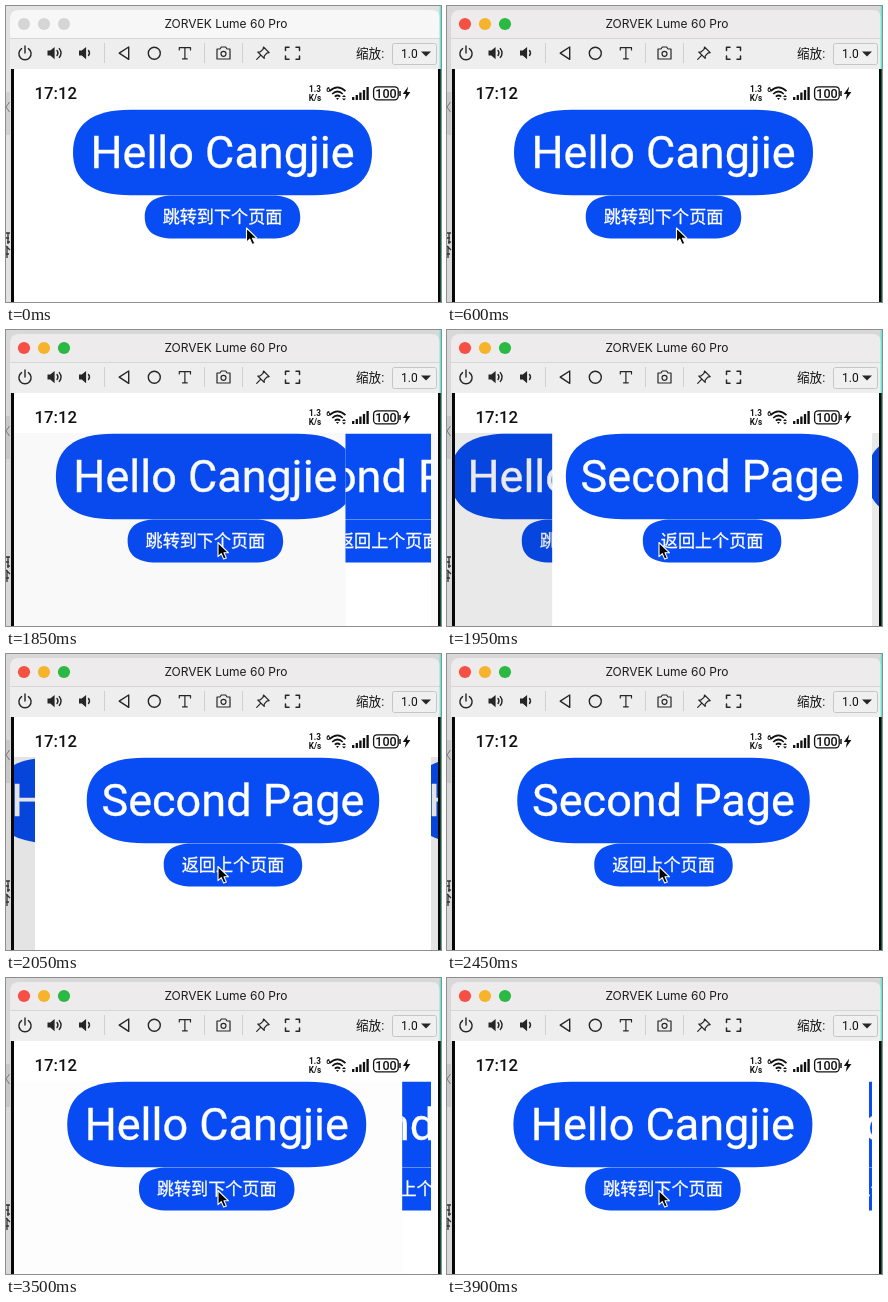
An HTML page for the animation above (4250 ms loop, 435 px wide and 296 px high).

```html
<!DOCTYPE html>
<html lang="zh">
<head>
<meta charset="utf-8">
<title>Page navigation</title>
<style>
  html, body { margin: 0; width: 100%; height: 100%; overflow: hidden; background: #ddd; }
  svg { display: block; width: 435px; height: 296px; }
  text { font-family: Roboto, "Noto Sans CJK SC", "Noto Sans CJK", sans-serif; }
  .heading { font-size: 45px; stroke-width: .35; }
  .label { font: 500 17.1px "Noto Sans CJK SC", "Noto Sans CJK", sans-serif; stroke-width: .3; }
  .page text { fill: #fff; stroke: #fff; text-anchor: middle; }
  .page path { fill: #084cf4; }
  .icon { fill: none; stroke: #262626; stroke-width: 1.4; stroke-linejoin: round; stroke-linecap: round; }
  .solid { fill: #262626; }
</style>
</head>
<body>
<svg viewBox="0 0 435 296" xmlns="http://www.w3.org/2000/svg">
  <defs>
    <clipPath id="viewClip"><rect x="8" y="103" width="417" height="193"/></clipPath>
    <clipPath id="wrapClip"><rect x="425" y="103" width="7" height="193"/></clipPath>
    <clipPath id="reveal"><rect id="revealBox" x="425" y="103" width="417" height="193"/></clipPath>
  </defs>

  <!-- desktop behind the window -->
  <rect id="desktop" width="435" height="296"/>
  <path d="M0 86H4V129H0Z" fill="#000" opacity=".08"/>
  <path d="M3.5 96L0 101L3.5 106" fill="none" stroke="#777"/>
  <path d="M0 227H4M0 232H3M1 236H4M0 240L4 244M0 248H3M2 227V238M1 240V252" stroke="#333" stroke-width="1.3"/>

  <!-- window -->
  <path id="titleBar" d="M4 32V13Q4 4 13 4H425Q434 4 434 13V32Z"/>
  <g id="lights"><circle cx="18" cy="18" r="6.1"/><circle cx="38" cy="18" r="6.1"/><circle cx="58" cy="18" r="6.1"/></g>
  <text x="220" y="22.2" text-anchor="middle" fill="#1c1c1c" style="font:400 12px Inter,sans-serif">ZORVEK Lume 60 Pro</text>
  <rect x="4" y="32" width="430" height="31" fill="#eeeeee"/>
  <path d="M4 32.5H434" stroke="#d6d6d6"/>
  <path d="M98.5 37V57M198.5 37V57M236.5 37V57" stroke="#cfcfcf"/>

  <!-- toolbar -->
  <g class="icon">
    <path d="M15.6 42.6A6.1 6.1 0 1 0 22.4 42.6M19 40V47"/>
    <path d="M51 44.5Q53 47 51 49.5M53.3 42.6Q56.8 47 53.3 51.4"/>
    <path d="M82.5 44.5Q84.5 47 82.5 49.5"/>
    <path d="M122.7 41V53.4L113.2 47.2Z"/>
    <circle cx="148.3" cy="47.2" r="6"/>
    <path d="M173.3 44V41.6H184.5V44M178.9 41.6V52.8M176.5 52.8H181.3" stroke-width="1.2"/>
    <path d="M211 43H214L215.3 41H219.7L221 43H224V53H211Z" stroke-width="1.2"/>
    <circle cx="217.5" cy="47.8" r="2.5" stroke-width="1.2"/>
    <path d="M257.5 41L263.2 46.7L260.8 47.2L258.2 50.2V52.4L251.8 46H254L257 43.4ZM254.8 49.2L250.7 53.3" stroke-width="1.2"/>
    <path d="M279.5 44.5V41.3H283M290 41.3H293.5V44.5M293.5 50V53.2H290M283 53.2H279.5V50" stroke-width="1.5"/>
  </g>
  <path class="solid" d="M41.5 44.6H44.3L48.6 41V53.2L44.3 49.6H41.5ZM73 44.6H75.8L80.1 41V53.2L75.8 49.6H73Z"/>
  <text x="350" y="52" font-size="12.6" fill="#111">缩放:</text>
  <rect x="386.5" y="37.5" width="44" height="21" rx="2" fill="#f0f0f0" stroke="#c6c6c6"/>
  <text x="395" y="52" font-size="12" fill="#111">1.0</text>
  <path class="solid" d="M415 45.5H425L420 50.5Z"/>

  <!-- device screen -->
  <rect x="5" y="63" width="429" height="233" fill="#080808"/>
  <rect x="8" y="63" width="424" height="233" fill="#fff"/>
  <text x="28.5" y="92.7" font-size="16.7" font-weight="500" fill="#111">17:12</text>
  <g fill="#111" font-size="8.2" font-weight="700" text-anchor="middle">
    <text x="309" y="86.3">1.3</text><text x="309" y="94.5">K/s</text>
    <text x="322.3" y="86" font-size="7">6</text>
    <text x="380" y="91.7" font-size="12.5" font-weight="500">100</text>
  </g>
  <g fill="none" stroke="#111" stroke-width="1.7">
    <path d="M323.5 85.2Q331.5 77.5 339.5 85.2M326.2 88Q331.5 83 336.8 88M328.8 90.7Q331.5 88.3 334.2 90.7"/>
    <rect x="367.6" y="80.8" width="24.6" height="13" rx="3.5" stroke-width="1.3"/>
    <path d="M394 85V90" stroke-width="1.5"/>
    <path d="M347.2 94V91M350.8 94V89M354.4 94V86.6M358 94V84M361.6 94V81" stroke-width="2.3"/>
  </g>
  <path d="M330 92L331.5 94L333 92ZM336 91L338 89L340 91ZM336 92.5H340L338 94.5ZM402.2 80.5L396.8 88H400L398.7 94L404.4 86H401Z" fill="#111"/>

  <g id="view" clip-path="url(#viewClip)">
    <rect x="8" y="103" width="417" height="193" fill="#fff"/>
    <g id="first" class="page"></g>
    <rect id="dim" x="8" y="103" width="417" height="193" opacity="0"/>
    <g clip-path="url(#reveal)">
      <rect x="8" y="103" width="900" height="193" fill="#fff"/>
      <g id="second" class="page"></g>
    </g>
  </g>
  <!-- the display is slightly wider than a page and repeats its left edge -->
  <g clip-path="url(#wrapClip)"><use href="#view" x="417"/></g>

  <path d="M434.3 0V63" stroke="#5fe8d8" stroke-width="1.4"/>
  <path d="M434.5 63V296" stroke="#0b5a38"/>
  <path id="cursor" d="M0 0V14.2L3.3 11.2L5.7 16.6L8.3 15.4L6 10.2H10.4Z" fill="#050505" stroke="#fff" stroke-width="1.1" stroke-linejoin="round"/>
</svg>
<script>
const LOOP = 4250, PAGE_LEFT = 8, PAGE_WIDTH = 417, CENTER = 216.5;
const $ = id => document.getElementById(id);

// Pill whose round ends blend smoothly into the straight sides
function pill(top, width, height) {
  const r = height / 2, flat = width - 2.7 * r;
  return `M${CENTER - width / 2} ${top + r}
    c0 ${-0.64 * r} ${0.42 * r} ${-r} ${1.35 * r} ${-r} h${flat}
    c${0.93 * r} 0 ${1.35 * r} ${0.36 * r} ${1.35 * r} ${r}
    c0 ${0.64 * r} ${-0.42 * r} ${r} ${-1.35 * r} ${r} h${-flat}
    c${-0.93 * r} 0 ${-1.35 * r} ${-0.36 * r} ${-1.35 * r} ${-r}z`;
}

const button = (top, width, height, style, baseline, text) =>
  `<path d="${pill(top, width, height)}"/>
   <text class="${style}" x="${CENTER}" y="${baseline}">${text}</text>`;

const fillPage = (id, title, titleWidth, action, actionWidth) => {
  $(id).innerHTML = button(103.7, titleWidth, 85.6, "heading", 162, title)
    + button(189.5, actionWidth, 43, "label", 217.2, action);
};
fillPage("first", "Hello Cangjie", 299, "跳转到下个页面", 155.5);
fillPage("second", "Second Page", 292.5, "返回上个页面", 138.5);

const lights = [...$("lights").children];
const clamp = v => Math.min(1, Math.max(0, v));
const ease = v => { v = clamp(v); return v * v * (3 - 2 * v); };
const shift = (id, x, y = 0) => $(id).setAttribute("transform", `translate(${x.toFixed(2)} ${y.toFixed(2)})`);

// Critically damped spring from 0 to 1
const spring = ms => {
  const u = Math.max(0, ms) * 0.0195;
  return 1 - (1 + u) * Math.exp(-u);
};

// How far the second page covers the first, 0 to 1
function coverage(t) {
  if (t < 3278) return spring(t - 1808);
  return Math.max(1 - spring(t - 3278), 3 / PAGE_WIDTH);
}

function drawWindow(focused) {
  const colors = focused ? ["#f64f44", "#f6b32c", "#2cb844"] : ["#d5d5d5", "#d5d5d5", "#d5d5d5"];
  lights.forEach((light, i) => light.setAttribute("fill", colors[i]));
  $("titleBar").setAttribute("fill", focused ? "#edebec" : "#f7f7f7");
  $("desktop").setAttribute("fill", focused ? "#d8d8d8" : "#e2e2e2");
}

function draw(t) {
  drawWindow(t >= 50);

  const cover = coverage(t);
  const edge = PAGE_WIDTH * (1 - cover);
  shift("first", -0.2 * PAGE_WIDTH * cover);
  shift("second", edge / 2);
  $("revealBox").setAttribute("x", PAGE_LEFT + edge);
  $("dim").setAttribute("opacity", 0.11 * cover);

  const drift = ease((t - 30) / 520), approach = ease((t - 1130) / 470);
  shift("cursor", 240.5 - 11 * drift - 17.5 * approach, 222 - 9.5 * approach);
}

const start = performance.now();
function tick() {
  draw((performance.now() - start) % LOOP);
  requestAnimationFrame(tick);
}
draw(0);
requestAnimationFrame(tick);
</script>
</body>
</html>
```
